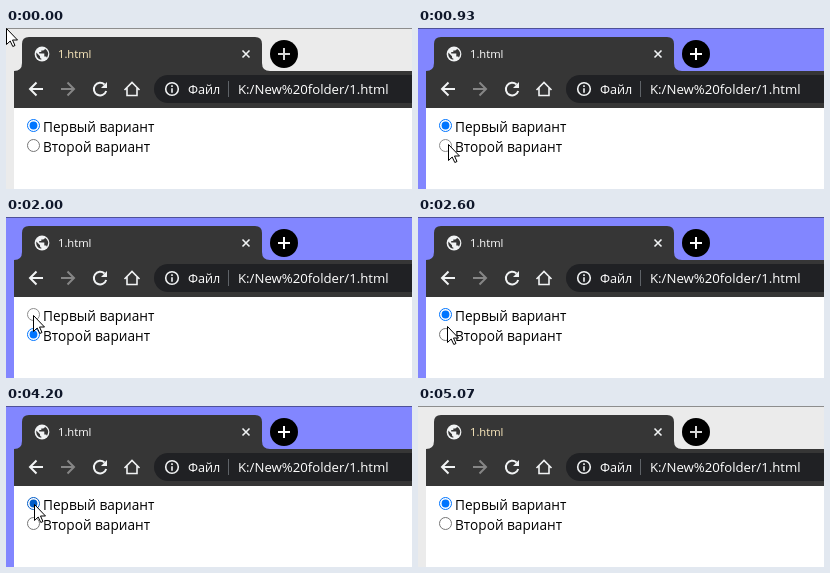
An HTML page that plays this animation: 406 px wide and 161 px high, repeating every 5270 ms.

```html
<!DOCTYPE html>
<html lang="ru">
<meta charset="utf-8">
<title>1.html</title>
<style>
  html, body { margin: 0; width: 100%; height: 100%; overflow: hidden; }
  svg { display: block; width: 406px; height: 161px; }
  text { font-family: "Open Sans", "Noto Sans", sans-serif; }
  .bar { font-weight: 500; fill: #fff; }
  .line { fill: none; stroke: #f1f3f4; stroke-width: 2; }
  .thin { stroke-width: 1.6; }
</style>
<svg viewBox="0 0 406 161">
  <rect id="frame" width="406" height="161"/>
  <path d="M0 .5H406" stroke="#000" stroke-opacity=".4"/>

  <!-- tab strip -->
  <path d="M8 43Q16 43 16 35V16Q16 9 23 9H249Q256 9 256 16V35Q256 43 264 43H406V80H8Z" fill="#363636"/>
  <circle cx="36" cy="26" r="7.4" fill="#f1f3f4"/>
  <path d="M30.300 24.500L34 28.200V29Q34 30.500 35.300 30.500V31.800Q29.500 30.800 30.300 24.500ZM39 20.800Q38.600 22.300 37 22.400H35.300V24.100H33.200V25.600H38.300V28.600H40.200L41 29.700Q44 24 39 20.800Z" fill="#363636"/>
  <text id="title" x="52" y="30" font-size="11.2" font-weight="500">1.html</text>
  <path class="line thin" d="M236.500 22.500L243.500 29.500M243.500 22.500L236.500 29.500"/>
  <circle cx="278" cy="26" r="14" fill="#000"/>
  <path id="plus" d="M272 26H284M278 20V32" stroke-width="2"/>

  <!-- toolbar -->
  <path class="line" d="M37 61H24.500M30.500 54.500L24 61L30.500 67.500"/>
  <path class="line" d="M55 61H67.500M61.500 54.500L68 61L61.500 67.500" style="stroke:#868686"/>
  <path class="line" d="M98.500 56.500A6.300 6.300 0 1 0 100.200 63"/>
  <path d="M101 54V60H95Z" fill="#f1f3f4"/>
  <path class="line thin" d="M118.500 62L126 54.500L133.500 62M121 60V67.500H131V60"/>
  <rect x="148" y="47" width="290" height="28" rx="14" fill="#202124"/>
  <circle class="line thin" cx="166" cy="61" r="6.3"/>
  <path class="line thin" d="M166 57.300V59M166 60.200V64.700"/>
  <text class="bar" x="182" y="66" font-size="12.6">Файл</text>
  <path d="M222.500 53V69" stroke="#5f6368"/>
  <text class="bar" x="232" y="66" font-size="13.2">K:/New%20folder/1.html</text>

  <!-- page -->
  <rect x="8" y="80" width="398" height="81" fill="#fff"/>
  <g class="radio"><circle cx="27.5" cy="97.5" r="6" fill="#fff"/><circle cx="27.5" cy="97.5" r="3.9"/></g>
  <g class="radio"><circle cx="27.5" cy="117.5" r="6" fill="#fff"/><circle cx="27.5" cy="117.5" r="3.9"/></g>
  <text x="37" y="104" font-size="13.65">Первый вариант</text>
  <text x="37" y="124" font-size="13.65">Второй вариант</text>
  <path id="cursor" d="M.5 .5V16.500L4.200 13L6.800 18.500L9 17.500L6.500 12H11.500Z" fill="#fff" stroke="#000"/>
</svg>
<script>
  const $ = id => document.getElementById(id);
  const radios = [...document.querySelectorAll('.radio')];
  const TICKS = 79, TICKS_PER_MS = 0.015, LOOP = 5270;

  // Pointer strokes: each bends from the last stop to the next, slowing down
  const strokes = [
    { start: 0, end: 8, bend: [70, 85], to: [29, 107] },
    { start: 8, end: 11, bend: [29, 112], to: [30, 116] },
    { start: 20, end: 27, bend: [18, 112], to: [27, 98] },
    { start: 36, end: 43, bend: [30, 104], to: [29, 117] },
    { start: 52, end: 53, bend: [28, 114], to: [28, 114] },
    { start: 55, end: 58, bend: [31, 106], to: [28, 98] },
    { start: 65, end: 71, bend: [30, 130], to: [47, 162] }
  ];
  const clicks = [
    { down: 14, up: 16, radio: 1 },
    { down: 30, up: 34, radio: 0 },
    { down: 48, up: 49, radio: 1 },
    { down: 62, up: 63, radio: 0 }
  ];

  function pointerAt(tick) {
    let pos = [0, 0];
    for (const { start, end, bend, to } of strokes) {
      if (tick < start) break;
      const left = (1 - Math.min(1, (tick - start) / (end - start))) ** 2;
      const u = 1 - left;
      pos = pos.map((from, i) => Math.round(left * left * from + 2 * u * left * bend[i] + u * u * to[i]));
    }
    return pos;
  }

  function draw(now) {
    const tick = Math.min(TICKS - 1, Math.floor((now % LOOP + 4) * TICKS_PER_MS));
    const active = tick >= 14 && tick < 76;
    const [x, y] = pointerAt(tick);
    const checked = clicks.filter(c => c.up <= tick).pop()?.radio ?? 0;
    const pressed = clicks.find(c => c.down <= tick && tick < c.up)?.radio;

    $('frame').setAttribute('fill', active ? '#8286ff' : '#ebebeb');
    $('title').setAttribute('fill', active ? '#fff' : '#ffedc0');
    $('plus').setAttribute('stroke', active ? '#fff' : '#d8d8d8');
    $('cursor').setAttribute('transform', `translate(${x} ${y})`);

    radios.forEach((radio, i) => {
      const hover = Math.hypot(x - 27.5, y - 97.5 - 20 * i) < 6.5;
      const state = pressed === i ? 2 : hover ? 1 : 0;
      const on = i === checked;
      const color = (on ? ['#0075ff', '#005cc8', '#3793ff'] : ['#767676', '#4f4f4f', '#8d8d8d'])[state];
      const [ring, dot] = radio.children;
      ring.setAttribute('stroke', color);
      dot.setAttribute('fill', on ? color : 'none');
    });
    requestAnimationFrame(() => draw(performance.now()));
  }
  draw(0);
</script>
</html>
```
